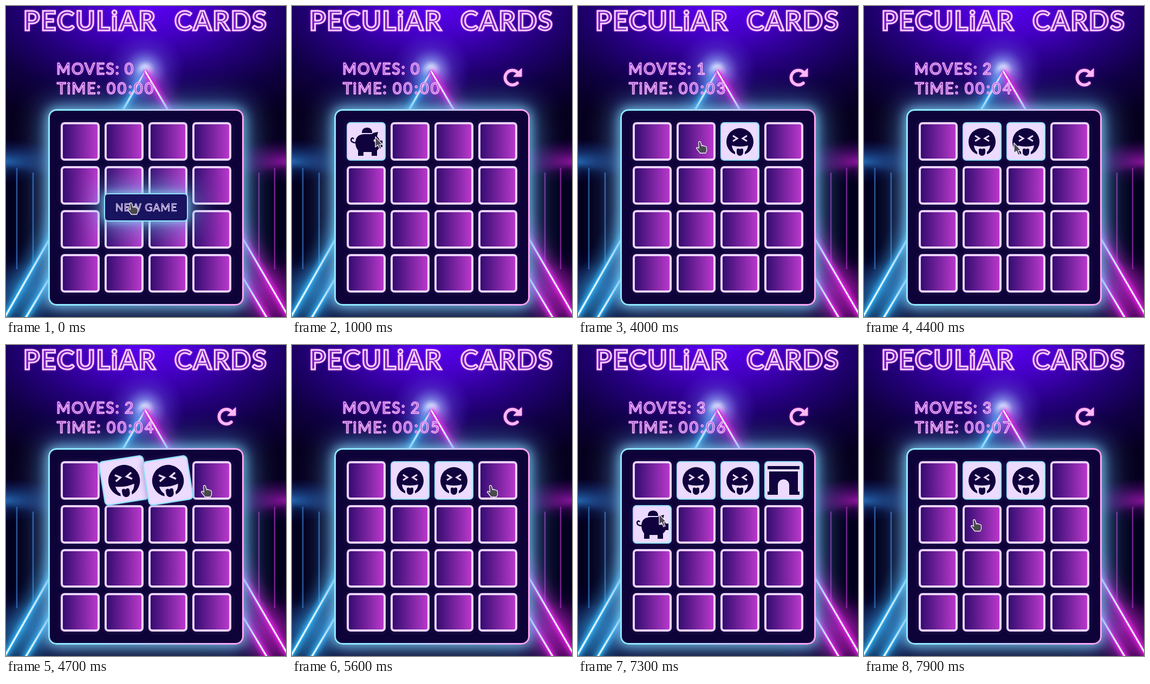
Recreate the animation shown at these times as an HTML page. Size 517 by 573 pixels, loop 8000 ms.

```html
<!DOCTYPE html>
<html lang="en">
<head>
<meta charset="utf-8">
<title>Peculiar Cards</title>
<style>
html, body { margin: 0; width: 100%; height: 100%; overflow: hidden; background: #07001f; }
#stage { position: relative; width: 517px; height: 573px; overflow: hidden; }
#stage > svg, #board, #button, .tile, .tile svg { position: absolute; }
#scene, #hud, #pointer { left: 0; top: 0; width: 517px; height: 573px; }
#board {
  left: 78px; top: 190px; width: 355px; height: 356px;
  border: 3px solid transparent; border-radius: 15px;
  background: linear-gradient(#0e0338, #0e0338) padding-box,
    linear-gradient(90deg, #8fe6ff 20%, #ffa2f2) border-box;
  box-shadow: 0 0 20px 2px rgba(135, 210, 245, .8), 0 0 50px 12px rgba(90, 160, 225, .7);
}
.tile {
  box-sizing: border-box; width: 72px; height: 71px;
  border: 4px solid #ecd2fb; border-radius: 7px;
  background: linear-gradient(90deg, #340c70, #b838cb);
  box-shadow: 0 0 9px rgba(70, 50, 130, .45);
}
.tile svg { display: none; left: -2px; top: -2px; width: 72px; height: 72px; }
.tile.open { border: 2px solid #8fe2fb; background: #ecdaff; }
.tile.open svg { display: block; }
#button {
  box-sizing: border-box; left: 181px; top: 345px; width: 155px; height: 52px;
  border: 2px solid #8fe2fb; border-radius: 7px; background: #191460;
  box-shadow: 0 0 16px 1px rgba(140, 215, 250, .8), 0 0 48px 12px rgba(120, 190, 240, .65);
}
text { font-family: Lato, "Open Sans", sans-serif; }
.title { font-size: 49px; font-weight: 700; letter-spacing: 2px; fill: #7a1cc0; stroke: #f5d2ff; stroke-width: 3px; }
.label { font-size: 28px; letter-spacing: 2.1px; fill: #7a18b8; stroke: #f5cdff; stroke-width: 1.5px; }
.clock { letter-spacing: 3.6px; }
.glow { filter: drop-shadow(0 0 1.5px rgba(235, 40, 240, .85)); }
.caption { font-size: 19px; letter-spacing: 1.2px; fill: #191460; stroke: #f0dcff; stroke-width: 1.1px; }
</style>
</head>
<body>
<div id="stage">
  <svg id="scene" viewBox="0 0 517 573">
    <defs>
      <radialGradient id="sky" gradientUnits="userSpaceOnUse" cx="0" cy="0" r="1" gradientTransform="translate(262 -5) scale(430 240)">
        <stop offset="0" stop-color="#5c00fa"/>
        <stop offset=".25" stop-color="#4400c4"/>
        <stop offset=".5" stop-color="#25007e"/>
        <stop offset=".75" stop-color="#0f0042"/>
        <stop offset="1" stop-color="#07001f"/>
      </radialGradient>
      <radialGradient id="star">
        <stop offset="0" stop-color="#fff"/>
        <stop offset=".1" stop-color="#dcecff"/>
        <stop offset=".25" stop-color="#94a8ff" stop-opacity=".7"/>
        <stop offset=".55" stop-color="#6a50e8" stop-opacity=".35"/>
        <stop offset="1" stop-color="#5a20e0" stop-opacity="0"/>
      </radialGradient>
      <radialGradient id="blue">
        <stop offset="0" stop-color="#2a76c4" stop-opacity=".9"/>
        <stop offset="1" stop-color="#102a80" stop-opacity="0"/>
      </radialGradient>
      <radialGradient id="pink">
        <stop offset="0" stop-color="#a81ab8" stop-opacity=".85"/>
        <stop offset="1" stop-color="#500880" stop-opacity="0"/>
      </radialGradient>
      <filter id="soft" filterUnits="userSpaceOnUse" x="-60" y="-40" width="640" height="680">
        <feGaussianBlur stdDeviation="4"/>
      </filter>
      <filter id="wide" filterUnits="userSpaceOnUse" x="-60" y="-40" width="640" height="680">
        <feGaussianBlur stdDeviation="14"/>
      </filter>
    </defs>
    <rect width="517" height="573" fill="#07001f"/>
    <rect width="517" height="240" fill="url(#sky)"/>
    <ellipse cx="-5" cy="287" rx="125" ry="42" fill="url(#blue)"/>
    <ellipse cx="522" cy="287" rx="125" ry="42" fill="url(#pink)"/>
    <ellipse cx="30" cy="520" rx="140" ry="80" fill="url(#blue)" opacity=".6"/>
    <ellipse cx="487" cy="520" rx="140" ry="80" fill="url(#pink)" opacity=".6"/>
    <path d="M0 296 84 312V470L0 480Z M517 296 433 312V470L517 480Z" fill="#05001c" opacity=".5" filter="url(#soft)"/>
    <g fill="none" stroke-width="2.5" opacity=".85">
      <path d="M20 298V485M50 307V482" stroke="#2f67b0"/>
      <path d="M496 298V485M467 307V482" stroke="#8a2a9e"/>
    </g>
    <circle cx="257" cy="118" r="74" fill="url(#star)"/>
    <g id="beams" fill="none"></g>
  </svg>

  <div id="board"></div>
  <div id="tiles"></div>
  <div id="button">
    <svg width="151" height="48"><text class="caption" x="19" y="31">NEW GAME</text></svg>
  </div>

  <svg id="hud" viewBox="0 0 517 573">
    <g class="glow">
      <text class="title" x="32" y="45">PECULiAR</text>
      <text class="title" x="311" y="45">CARDS</text>
      <text class="label" x="93" y="126">MOVES:</text>
      <text class="label" x="219" y="126" id="moves">0</text>
      <text class="label" x="94" y="162">TiME:</text>
      <text class="label clock" x="186" y="162" id="clock">00:00</text>
      <g id="reload">
        <path d="M416 122A13.5 13.5 0 1 0 416 142" fill="none" stroke="#ffb9f3" stroke-width="5.5" stroke-linecap="round"/>
        <path d="M424 115V130H409Z" fill="#ffb9f3" stroke="#ffb9f3" stroke-linejoin="round"/>
      </g>
    </g>
  </svg>

  <svg id="pointer" viewBox="0 0 517 573">
    <g id="cursor" fill="#49484f" stroke="#f4eef8" stroke-width="1.3" stroke-linejoin="round">
      <path id="arrow" d="M0 0V19L4.5 15 8 23 11 21.5 8 14H13Z"/>
      <path id="hand" transform="translate(-2.5 0)" d="M-2 2Q0-1 2 2L4 9Q6 7 7 9Q9 8 10 10Q13 9 13 13V18L11 22H1L-6 13Q-5 10-1 13Z"/>
    </g>
  </svg>
</div>

<script>
const LOOP = 8000, STEP = 100, PITCH = 81, LEFT = 101, TOP = 214;
const $ = id => document.getElementById(id);

const ICONS = {
  pig: `<path d="M28 20Q28 10 37.5 10T47 20Z"/>
    <path d="M16 37Q17 22 34 22H46Q49 19 58 18L56 26Q60 30 61 34H66V46H61Q59 50 56 52V62H46V55H31V62H21V52Q16 46 16 37Z"/>
    <path d="M17 38Q8 38 8 32Q10 27 13 31" fill="none" stroke="#10023d" stroke-width="2.5"/>
    <circle cx="52" cy="34" r="2.4" fill="#ecdaff"/>`,
  tongue: `<circle cx="36" cy="36" r="25"/>
    <path d="M23 25 31 30 23 35M49 25 41 30 49 35" fill="none" stroke="#ecdaff" stroke-width="3"/>
    <path d="M21 43Q36 47 51 43Q50 51 45 55V62H27V55Q22 51 21 43Z" fill="#ecdaff"/>
    <path d="M30 50Q33 47 36 50Q39 47 42 50V56A6 6 0 0 1 30 56Z"/>`,
  arch: `<path d="M6 9H65V15H6Z M9 19H62V56H65V62H46V44A10.5 10.5 0 0 0 25 44V62H6V56H9Z"/>`
};
const CARDS = ["pig", "tongue", "tongue", "arch", "pig"];

// [tile, opens, closes]
const OPEN = [[0, 900, 2200], [1, 1600, 2200], [2, 2900, LOOP], [1, 4100, LOOP], [3, 5800, 7400], [4, 6500, 7400]];
const MOVES = [1600, 4100, 6500];
const SECONDS = [1400, 2300, 3300, 4300, 5300, 6400, 7400];
const START = 400;

// [time, x, y]
const PATH = [
  [0, 233, 362], [200, 233, 362], [900, 154, 241], [1100, 154, 241], [1500, 226, 250],
  [2000, 226, 250], [2400, 270, 264], [2800, 270, 264], [2900, 334, 279], [3300, 334, 279],
  [3900, 227, 249], [4200, 227, 249], [4700, 369, 258], [5900, 369, 258], [6300, 157, 307],
  [6500, 150, 312], [7300, 150, 312], [7900, 206, 321]
];
// [time, scale, degrees]
const WOBBLE = [[4500, 1, 0], [4700, 1.17, -9], [4900, 1.25, 8], [5200, 1.25, 8], [5300, 1.2, -6], [5500, 1.2, -6], [5600, 1, 0]];

const count = (times, t) => times.filter(at => at <= t).length;

function sample(keys, t) {
  const next = keys.findIndex(key => key[0] > t);
  if (next === 0) return keys[0].slice(1);
  if (next < 0) return keys[keys.length - 1].slice(1);
  const a = keys[next - 1], b = keys[next];
  const p = (t - a[0]) / (b[0] - a[0]), ease = p * p * (3 - 2 * p);
  return a.slice(1).map((value, i) => value + (b[i + 1] - value) * ease);
}

function addBeam(d, color) {
  const layers = [[color, 30, .5, "url(#wide)"], [color, 12, .8, "url(#soft)"], [color, 6, .9, ""], ["#eefaff", 3, 1, ""]];
  $("beams").innerHTML += layers.map(([stroke, width, opacity, filter]) =>
    `<path d="${d}" stroke="${stroke}" stroke-width="${width}" opacity="${opacity}" ${filter && `filter="${filter}"`}/>`).join("");
}
addBeam("M257 120 -6 580M88 488 33 580", "#35b4f4");
addBeam("M257 120 526 580M430 488 485 580", "#e720e0");

const tiles = Array.from({ length: 16 }, (_, i) => {
  const tile = document.createElement("div");
  tile.className = "tile";
  tile.style.left = LEFT + i % 4 * PITCH + "px";
  tile.style.top = TOP + Math.floor(i / 4) * PITCH + "px";
  tile.innerHTML = `<svg viewBox="0 0 72 72" fill="#10023d">${ICONS[CARDS[i]] || ""}</svg>`;
  $("tiles").append(tile);
  return tile;
});

function tileAt(x, y) {
  const dx = x - LEFT, dy = y - TOP;
  const inside = dx >= 0 && dy >= 0 && dx < 4 * PITCH && dy < 4 * PITCH && dx % PITCH < 72 && dy % PITCH < 71;
  return inside ? Math.floor(dy / PITCH) * 4 + Math.floor(dx / PITCH) : -1;
}

function draw(t) {
  const isOpen = i => OPEN.some(([tile, from, to]) => tile === i && t >= from && t < to);
  const [scale, angle] = sample(WOBBLE, t);
  tiles.forEach((tile, i) => {
    const wobbling = (i === 1 || i === 2) && scale !== 1;
    tile.classList.toggle("open", isOpen(i));
    tile.style.transform = wobbling ? `rotate(${angle}deg) scale(${scale})` : "";
    tile.style.zIndex = wobbling ? 1 : "";
  });

  const started = t >= START;
  $("button").style.display = started ? "none" : "";
  $("reload").style.display = started ? "" : "none";
  $("moves").textContent = count(MOVES, t);
  $("clock").textContent = "00:0" + count(SECONDS, t);

  const [x, y] = sample(PATH, t);
  const hovered = tileAt(x, y);
  const clickable = !started || (hovered >= 0 && !isOpen(hovered));
  $("cursor").setAttribute("transform", `translate(${x} ${y})`);
  $("hand").style.display = clickable ? "" : "none";
  $("arrow").style.display = clickable ? "none" : "";
}

const origin = performance.now();
function tick() {
  const t = (performance.now() - origin) % LOOP;
  draw(Math.floor(t / STEP) * STEP);
  requestAnimationFrame(tick);
}
tick();
</script>
</body>
</html>
```
